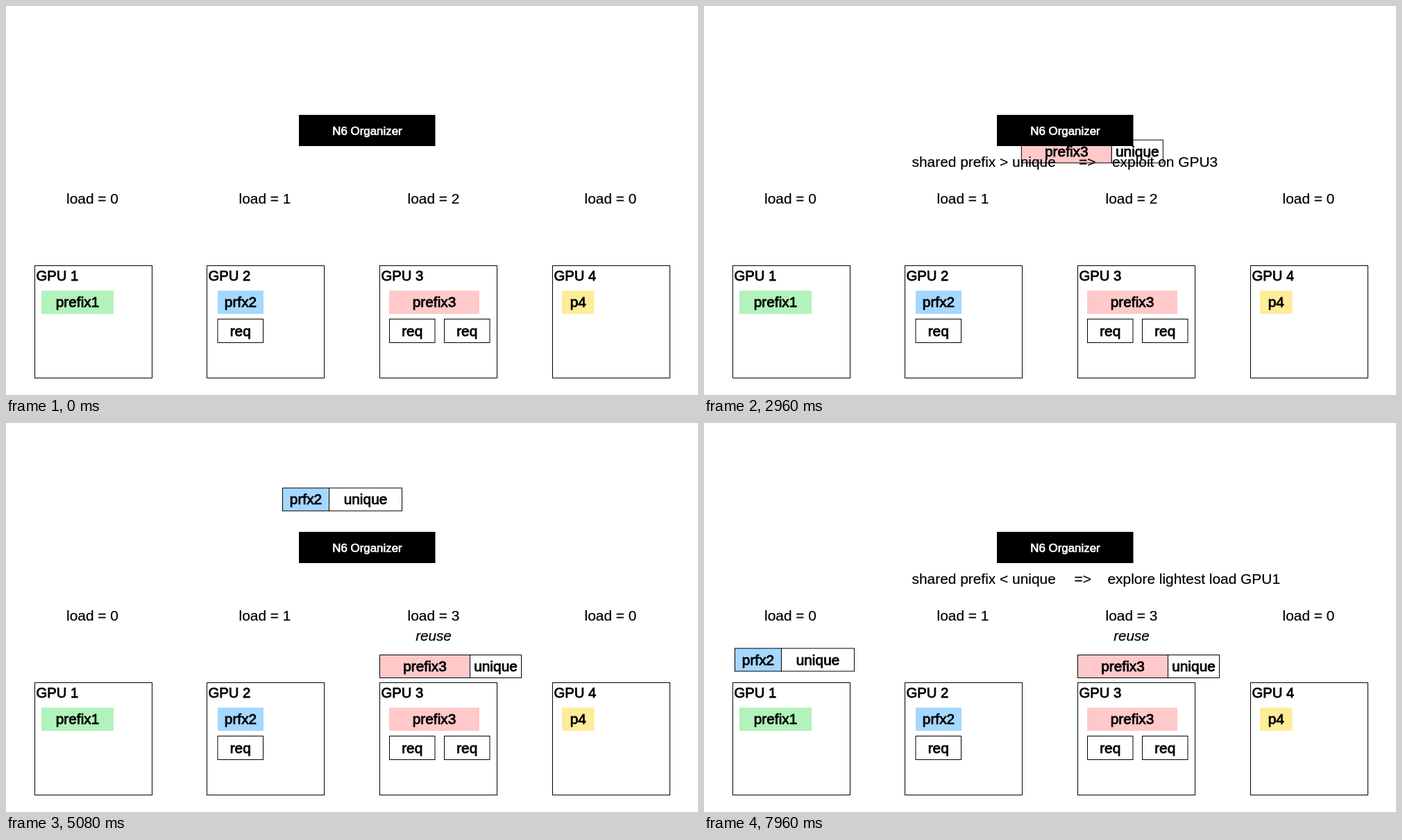
An HTML page with a canvas for the animation above (8000 ms loop, 997 px wide and 561 px high).

```html
<!DOCTYPE html>
<html lang="en">
<head>
<meta charset="utf-8">
<title>Request scheduling</title>
<style>
html, body { margin: 0; width: 100%; height: 100%; overflow: hidden; background: #fff; }
canvas { display: block; }
</style>
</head>
<body>
<canvas id="stage" width="997" height="561"></canvas>
<script>
const ctx = document.getElementById('stage').getContext('2d');
const LOOP = 8000;
const FAMILY = '"Liberation Sans", Arial, sans-serif';
const GREEN = '#b2f2bb', BLUE = '#a5d8ff', PINK = '#ffc9c9', YELLOW = '#ffec99';
const REGULAR = 0.2, MEDIUM = 0.85; // outline that thickens the glyphs

function text(str, x, y, { size = 20.9, align = 'left', weight = REGULAR, italic = false, color = '#000' } = {}) {
  ctx.font = `${italic ? 'italic ' : ''}${size}px ${FAMILY}`;
  ctx.textAlign = align;
  ctx.fillStyle = ctx.strokeStyle = color;
  ctx.lineWidth = weight;
  ctx.lineJoin = 'round';
  ctx.fillText(str, x, y);
  ctx.strokeText(str, x, y);
}

function outline(x, y, w, h) {
  ctx.strokeStyle = '#000';
  ctx.lineWidth = 1;
  ctx.lineJoin = 'miter';
  ctx.strokeRect(x, y, w, h);
}

function box(x, y, w, h, fill, outlined, label) {
  ctx.fillStyle = fill;
  ctx.fillRect(x, y, w, h);
  if (outlined) outline(x, y, w, h);
  if (label) text(label, x + w / 2, y + h / 2 + 7, { align: 'center', weight: MEDIUM });
}

const chip = (x, w, fill, label) => box(x, 410.5, w, 33.5, fill, false, label);
const request = x => box(x, 451.5, 65.5, 34, '#fff', true, 'req');

// Vertical offset from rest: falls in, then a damped swing
function dropOffset(t) {
  if (t >= 400) return 0;
  if (t < 120) return -135 * (1 - (Math.max(t, 0) / 120) ** 2);
  const s = t - 120;
  return 23 * Math.exp(-0.0115 * s) * Math.sin(Math.PI * s / 80);
}

function ease(t, start, duration) {
  const u = Math.min(Math.max((t - start) / duration, 0), 1);
  return (1 - Math.cos(Math.PI * u)) / 2;
}

const packets = [
  { label: 'prefix3', fill: PINK, w: 130, rest: 74, from: [403.5, 99.5], to: [538.5, 334.5], enter: 0, leave: 2700, duration: 600 },
  { label: 'prfx2', fill: BLUE, w: 67, rest: 105, from: [398.5, 99.5], to: [44.5, 325], enter: 4840, leave: 7545, duration: 415 }
];

function drawPacket(p, t) {
  const k = ease(t, p.leave, p.duration);
  const x = p.from[0] + (p.to[0] - p.from[0]) * k;
  const y = p.from[1] + (p.to[1] - p.from[1]) * k + dropOffset(t - p.enter);
  box(x, y, p.w, 33, p.fill, true, p.label);
  box(x + p.w, y, p.rest, 33, '#fff', true, 'unique');
}

function draw(t) {
  ctx.fillStyle = '#fff';
  ctx.fillRect(0, 0, 997, 561);

  for (const p of packets) drawPacket(p, t);

  box(422, 157, 196.5, 45, '#000');
  text('N6 Organizer', 520.5, 185.5, { size: 16.9, align: 'center', weight: 0.7, color: '#fff' });

  [41.5, 289.5, 538.5, 787.5].forEach((x, i) => {
    outline(x, 374.5, 169, 162);
    text(`GPU ${i + 1}`, x + 2, 396, { size: 20.3, weight: MEDIUM });
  });

  const loads = [0, 1, t < 4080 ? 2 : 3, 0];
  [87, 335.5, 578.5, 833.5].forEach((x, i) => text(`load = ${loads[i]}`, x, 284.7));

  chip(51, 104, GREEN, 'prefix1');
  chip(305, 66, BLUE, 'prfx2');
  chip(552, 130, PINK, 'prefix3');
  chip(801, 46.5, YELLOW, 'p4');
  [305, 552.5, 631.5].forEach(request);

  if (t >= 3680) text('reuse', 616, 314, { size: 20.7, align: 'center', italic: true });

  if (t >= 1160 && t < 3680) text('shared prefix > unique', 299.5, 232);
  if (t >= 1960 && t < 3680) {
    text('=>', 540, 232);
    text('exploit on GPU3', 588, 232);
  }
  if (t >= 6000) text('shared prefix < unique', 299.5, 232);
  if (t >= 6800) {
    text('=>', 533.5, 232);
    text('explore lightest load GPU1', 581.5, 232);
  }
}

const begin = performance.now();
function tick() {
  draw((performance.now() - begin) % LOOP);
  requestAnimationFrame(tick);
}
tick();
</script>
</body>
</html>
```
